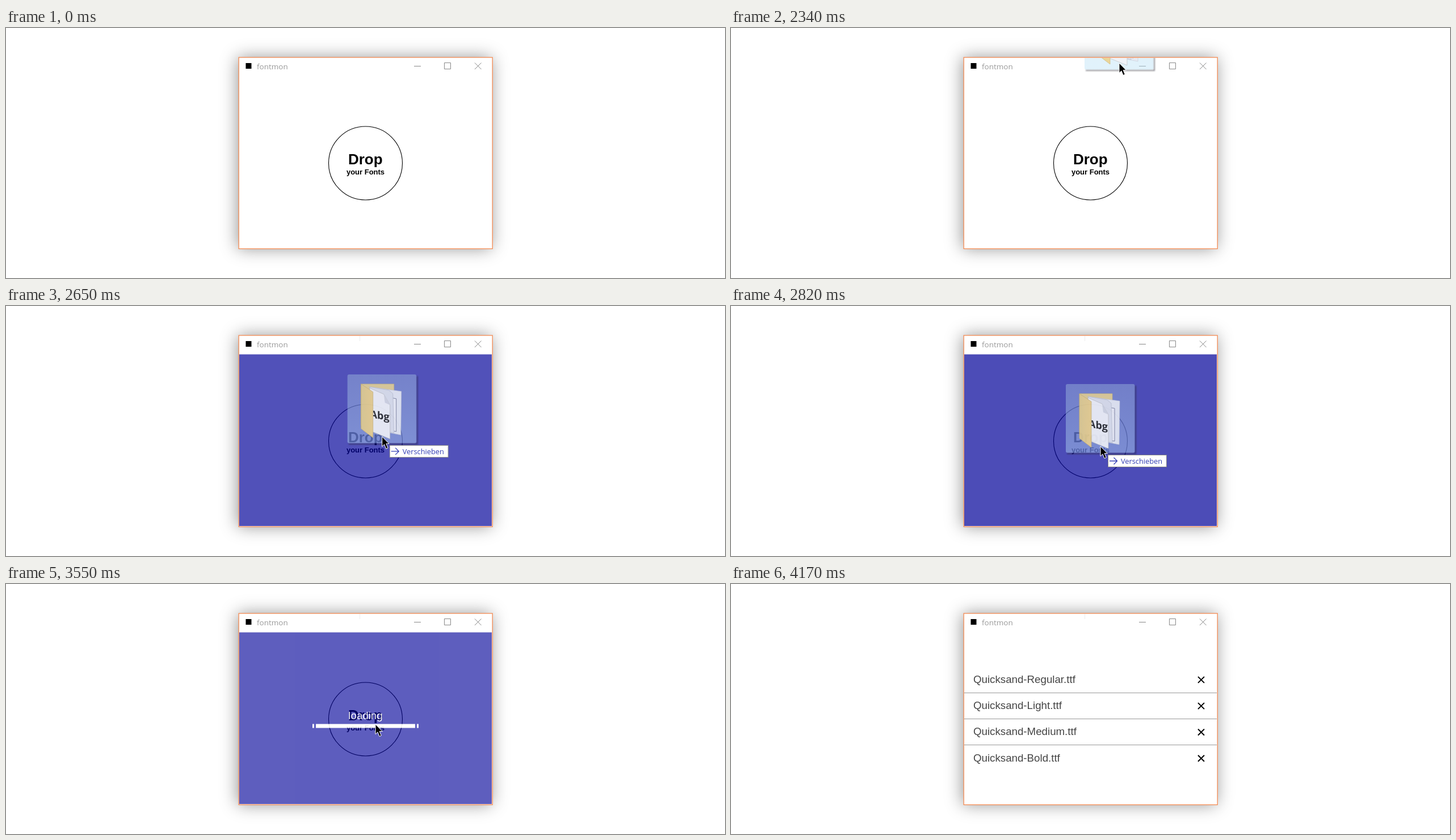
These frames come from a looping animation (1267 px wide and 442 px high, 5.74 s). An HTML page:

```html
<!DOCTYPE html>
<html lang="en">
<head>
<meta charset="utf-8">
<title>Drop your fonts</title>
<style>
  html, body { margin: 0; width: 100%; height: 100%; overflow: hidden; background: #fff; }
  #shadow {
    position: absolute; left: 410px; top: 52px; width: 447px; height: 338px;
    box-shadow: -2px 0 28px rgba(0, 0, 0, .42);
  }
  svg { position: absolute; left: 0; top: 0; }
  text { font-family: "Liberation Sans", Arial, sans-serif; }
  .ui { font-family: "Open Sans", "Noto Sans", sans-serif; }
  .bold { font-weight: bold; text-anchor: middle; }
  .row { font-size: 18.72px; }
</style>
</head>
<body>
<div id="shadow"></div>
<svg width="1267" height="442" viewBox="0 0 1267 442">
  <defs>
    <clipPath id="inside"><path d="M411 53H856V389H411Z"/></clipPath>
    <clipPath id="sheet"><path d="M-16 -90H14V4L-16 -8Z"/></clipPath>
    <filter id="soft" x="-20%" y="-20%" width="140%" height="140%"><feGaussianBlur stdDeviation="1.3"/></filter>
    <linearGradient id="tile" x2="0" y2="1">
      <stop stop-color="#b0d2e6" stop-opacity=".38"/>
      <stop offset="1" stop-color="#b9e2f7" stop-opacity=".43"/>
    </linearGradient>
    <linearGradient id="cover">
      <stop stop-color="#e3cd8c"/>
      <stop offset="1" stop-color="#efd28a"/>
    </linearGradient>
  </defs>

  <path d="M410 52H857V390H410Z" fill="#fff"/>
  <rect x="422.5" y="62" width="10" height="10"/>
  <text class="ui" x="442" y="73" font-size="13.5" fill="#999">fontmon</text>
  <path d="M719 67.5H731M772.5 61.5H783.5V72.5H772.5ZM826 61.5L837.5 73M837.5 61.5L826 73" fill="none" stroke="#888"/>
  <path id="ghost" d="M623.5 53V62" stroke="#eee"/>

  <g id="drop">
    <circle cx="633.5" cy="239" r="65" fill="none" stroke="#000" stroke-width="1.1"/>
    <text class="bold" x="633.3" y="240.5" font-size="26">Drop</text>
    <text class="bold" x="633.5" y="259" font-size="13">your Fonts</text>
  </g>
  <g id="list"></g>
  <path id="sliver" d="M748 384H803V389H748Z" fill="#eef6fc"/>

  <g id="overlay">
    <path d="M411 85.5H856V389H411Z" fill="#009" fill-opacity=".7"/>
    <g id="loading" fill="#fff">
      <text class="row" x="633.5" y="239" text-anchor="middle">loading</text>
      <path d="M540 247.5h3v7h-3zM724 247.5h3v7h-3z"/>
      <rect id="bar" x="546" y="247.5" width="175" height="7"/>
    </g>
  </g>

  <g clip-path="url(#inside)">
    <g id="pointer">
      <g id="drag">
        <path d="M-59 13H62V-107" fill="none" stroke="#223" stroke-opacity=".5" stroke-width="2" filter="url(#soft)"/>
        <rect x="-61" y="-110" width="121.5" height="121.5" rx="3" fill="url(#tile)"/>
        <g opacity=".87">
          <path d="M-37 -93H21V-20H-37Z" fill="#e3cf92" stroke="#c9b577" stroke-width=".7"/>
          <path d="M-22 -88L34 -80L33 -3L8 -8Z" fill="#e8ebf3" stroke="#c5c9d6" stroke-width=".7"/>
          <path d="M14 -69L25 -67V-9L14 -11" fill="#f0f1f7" stroke="#666b88" stroke-width=".8"/>
          <path d="M-22 -88L12 -82L19 -76L21 -6L10 -9Z" fill="#dfe2ec" stroke="#b8bccb" stroke-width=".7"/>
          <path d="M-22 -86L3 -75L14 -56V4L-18 -9Z" fill="#f3f4f8" stroke="#bbb" stroke-width=".7"/>
          <path d="M3 -75L5 -60L14 -56Z" fill="#d5d8e2"/>
          <g clip-path="url(#sheet)">
            <text class="ui" transform="translate(-21 -34) skewY(10)" font-size="18" font-weight="bold" textLength="" fill="#222">Abg</text>
          </g>
          <path d="M-37 -93L-16 -79V2L-37 -14Z" fill="url(#cover)" stroke="#c9b06c" stroke-width=".7"/>
        </g>
      </g>
      <g id="tip">
        <rect x="13.5" y="15.5" width="103" height="21" fill="#fff" stroke="#888"/>
        <path d="M16 26H29M23.5 20L29.5 26L23.5 32" fill="none" stroke="#3440b4" stroke-width="1.3"/>
        <text class="ui" x="36" y="31" font-size="12.8" fill="#3440b4">Verschieben</text>
      </g>
      <path d="M0 0V17.5L4 13.8L7 21.5L10.3 20L7.2 12.6H12.3Z" stroke="#fff"/>
    </g>
  </g>
  <rect x="410.2" y="52" width="447" height="338.3" fill="none" stroke="#f58346" stroke-width="1.2"/>
</svg>
<script>
const LOOP = 5740;
const STEPS = [0, 370, 440, 510,
  2340, 2370, 2440, 2510, 2580, 2650, 2720, 2750, 2820,
  3420, 3450, 3500, 3550, 3620, 3690, 3750, 3790, 3860, 3930, 4000, 4170];
const FONTS = ["Regular", "Light", "Medium", "Bold"];
const ROW = 46.3;

const $ = id => document.getElementById(id);
const show = (id, on) => $(id).setAttribute("visibility", on ? "visible" : "hidden");
const fade = (id, v) => $(id).setAttribute("opacity", v);
const progress = (t, from, to) => Math.min(1, Math.max(0, (t - from) / (to - from)));
const easeOut = (p, power = 2) => 1 - (1 - p) ** power;

// Rows stay centred vertically in the window.
function listMarkup(count, ink) {
  return FONTS.slice(0, count).map((name, i) => {
    const y = 238.3 + (i - (count - 1) / 2) * ROW;
    const line = Math.floor(238.3 + (i + 1 - count / 2) * 46) + .5;
    const rule = i < count - 1 ? `<path d="M411 ${line}H856" stroke="#999" stroke-width="1.2"/>` : "";
    return `<g opacity="${ink}">
      <text class="row" x="427" y="${y + 6}" fill="#444">Quicksand-${name}.ttf</text>
      <path d="M823 ${y - 5}l11 11m0 -11l-11 11" stroke="#000" stroke-width="2"/></g>${rule}`;
  }).join("");
}

function draw(t) {
  const listed = t >= 3930;
  const dragging = t >= 2340 && t < 3420;

  show("sliver", t >= 370 && t < 510);
  fade("sliver", t < 440 ? 1 : .6);
  show("ghost", t >= 2370);

  show("drop", !listed);
  $("list").innerHTML = listed ? listMarkup(t < 4170 ? 3 : 4, t < 4000 ? .7 : 1) : "";

  const shown = easeOut(progress(t, 2400, 2700));
  const gone = easeOut(progress(t, 3530, 3930));
  fade("overlay", shown * (1 - gone));
  show("loading", t >= 3450 && !listed);
  $("bar").setAttribute("width", 175 * progress(t, 3420, 3550));

  const move = progress(t, 2340, 2820);
  const x = 684 - 33 * move;
  const y = 62 + 186 * easeOut(move, 2.3);
  $("pointer").setAttribute("transform", `translate(${x} ${y})`);
  $("pointer").setAttribute("display", t >= 2340 && !listed ? "inline" : "none");
  show("drag", dragging);
  show("tip", dragging && t >= 2440);
}

let last = -1;
function tick(now) {
  const t = (now - start) % LOOP;
  const step = STEPS.findLast(s => s <= t) ?? 0;
  if (step !== last) draw(last = step);
  requestAnimationFrame(tick);
}
const start = performance.now();
draw(0);
requestAnimationFrame(tick);
</script>
</body>
</html>
```
